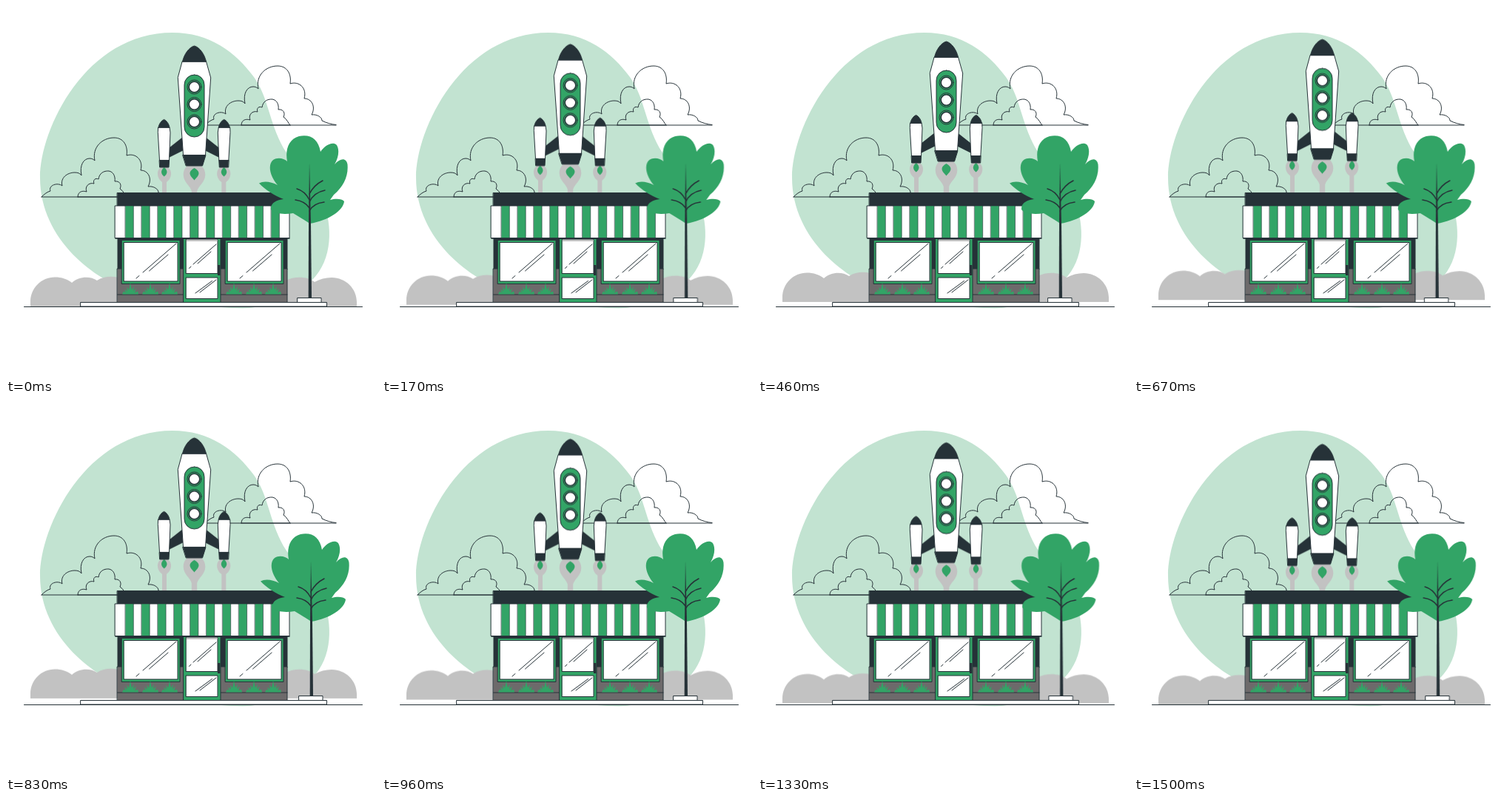
Animation, 500 px wide and 500 px high, one loop 1540 ms. Source, as an HTML page:

```html
<!DOCTYPE html>
<html lang="en">
<head>
<meta charset="utf-8">
<title>Shop launch</title>
<style>
  html, body { margin: 0; width: 100%; height: 100%; overflow: hidden; background: #fff; }
  svg { display: block; width: 100%; height: 100%; }
  .ink { fill: #263238; }
  .green { fill: #32a466; }
  .white { fill: #fff; }
  .grey { fill: #c2c2c2; }
  .wall { fill: #6d6a6b; }
  .line { stroke: #263238; stroke-width: 1; stroke-linejoin: round; stroke-linecap: round; }
  .open { fill: none; }
  .float { animation: float 1540ms linear -44ms infinite; }
  .shake { animation: shake 1540ms cubic-bezier(.3, .12, .7, .88) -44ms infinite; }
  @keyframes float {
    0%, 100% { transform: translateY(.5px); }
    50% { transform: translateY(-9.5px); }
  }
  @keyframes shake {
    0%, 100% { transform: translateX(.2px); }
    10%, 90% { transform: translateX(-.8px); }
    20%, 80% { transform: translateX(2.2px); }
    30%, 50%, 70% { transform: translateX(-3.8px); }
    40%, 60% { transform: translateX(4.2px); }
  }
</style>
</head>
<body>
<svg viewBox="0 0 500 500">
  <defs>
    <g id="cloud" class="line open">
      <path d="M48 258C52 254 56 251 60 250C57 242 70 238 76 243C73 232 83 225 93 225C97 225 100 226 102 229C99 215 105 206 113 206C116 206 118 207 120 209C116 191 130 178 146 178C159 178 165 189 163 202C175 198 186 208 182 222C192 222 198 233 192 244C199 243 206 247 206 252C212 255 219 257 225 257.500"/>
      <path d="M48 258H225M97 258H163M97 258C97 251 103 249 109 251C106 244 112 238 119 240C117 235 121 232 125 234C126 226 132 222.500 139 223C145 224 148 230 147 237C153 236 157 241 154 247C159 250 160 255 163 258"/>
    </g>

    <g id="booster">
      <path class="grey" d="M211 290V238C202 232 203 217 214 217S226 232 217 238V290Z"/>
      <path class="green" d="M213.700 218C216 220 217.500 222 217.500 224.500C217.500 227 215.500 229 213.700 230.500C212 229 210 227 210 224.500C210 222 211.500 220 213.700 218Z"/>
      <path class="ink" d="M239 177L220 192V205L240 195Z"/>
      <path class="white line" d="M206 164H221L222 171L220.500 209H207.500L205.300 171Z"/>
      <path class="ink line" d="M206 164C207 159 210 155 213.600 153.500C217 155 220 159 221 164ZM207.500 208.500H220.500L220 218H208Z"/>
    </g>

    <g id="port">
      <circle class="green line" r="9.500"/>
      <circle class="white line" r="7.300" style="stroke-width:1.600"/>
    </g>

    <path id="plant" class="green" d="M-11 15L-9 11L-6 13L-8 8L-4 11L-5 5L-2 9L0 0L2 9L5 4L4 11L8 7L6 13L10 11L11 15Z"/>

    <g id="window">
      <path class="green line" d="M156.500 316.500H235V375.500H156.500Z"/>
      <path class="white line" d="M159.500 319.500H232V372H159.500Z"/>
      <path class="line open" d="M185 360L230 321M193.500 358L219 336M176 368L180 364.500"/>
      <use href="#plant" x="168" y="374.500"/>
      <use href="#plant" x="195" y="374.500"/>
      <use href="#plant" x="221" y="374.500"/>
    </g>
  </defs>

  <path fill="#c2e3d1" d="M225 36C275 36 310 62 335 96C352 120 353 142 368 178C384 216 413 228 429 266C441 296 442 342 414 370C392 392 350 408.500 320 408.500C270 408 205 395 165 383C125 372 46 318 46 232C46 166 108 36 225 36Z"/>
  <use href="#cloud"/>
  <use href="#cloud" x="221" y="-97"/>

  <g class="float grey">
    <path d="M33 406V400C33 381 48 366.500 66 366.500C75 366.500 83 369 89 374C99 365 114 365 123 371C132 365 143 365 152 367V406Z"/>
    <path d="M378 406V371C390 365 407 365 417 373C424 369 432 367 440 367C459 367 474 382 474 400V406Z"/>
  </g>

  <g class="float">
    <use href="#booster"/>
    <use href="#booster" transform="matrix(-1 0 0 1 508.300 0)"/>
    <path class="grey" d="M250.800 290V250C249 243 239.700 238 239.700 228C239.700 219 246 213 254.500 213S269.300 219 269.300 228C269.300 238 260 243 258.200 250V290Z"/>
    <path class="green" d="M254.500 219C258 221 260.500 223 260.500 226C260.500 229.500 257 232.500 254.500 235.500C252 232.500 248.500 229.500 248.500 226C248.500 223 251 221 254.500 219Z"/>
    <path class="white line" d="M238.500 75H270.500L276.700 97L269.500 201.500H239.500L232.300 97Z"/>
    <path class="ink line" d="M238.500 75C241 65 247 56 254.500 54C262 56 268 65 270.500 75ZM239 201.500H270L265.500 216H243.500Z"/>
    <rect class="green line" x="241" y="93" width="27" height="84" rx="13.500"/>
    <use href="#port" x="254.500" y="109.500"/>
    <use href="#port" x="254.500" y="133"/>
    <use href="#port" x="254.500" y="156.500"/>
  </g>

  <path class="line open" d="M24.500 406.500H481.500"/>
  <path class="white line" d="M101 400.500H433.500V406H101Z"/>

  <path class="ink" d="M150.500 313H380.500V356H150.500Z"/>
  <path class="wall line" d="M150.500 355H380V400.500H150.500ZM150.500 390H380"/>
  <path class="ink line" d="M150.500 252.500H380V270H150.500Z"/>
  <path class="white line" d="M147.500 270H383V313.500H147.500Z"/>
  <g id="stripes" class="green line" style="stroke-width:.6"></g>
  <path class="line open" d="M148 314H383" style="stroke-width:1.600"/>

  <use href="#window"/>
  <use href="#window" x="140"/>

  <path class="green line" d="M240 314.500H290V400.500H240Z"/>
  <path class="white line" d="M243.500 315.500H286V361.500H243.500ZM243.500 367H286V395.500H243.500Z"/>
  <path class="grey" d="M244 315.500H285.500V318H244Z"/>
  <path class="line open" d="M253 349L284 322M259 348L277 332M247.500 354.500L250 352M256 388L278.500 371.500M262 387L284 370"/>
  <path class="ink" d="M286 350H289.500V364H286Z"/>

  <g class="shake">
    <path class="green" d="M410.500 294C403 289 395 284 388 280C376 282 362 281 358 275C357 266 366 262 375 261C362 256 350 248 342 239.500C348 236 358 237 367 242C357 230 353 215 361 208C367 204 376 206 380 210C377 194 382 180 396 176C412 173 422 180 425 197C430 189 440 183 446 187C451 192 450 204 444 214C452 205 460 205 461.500 214C463 230 456 244 443 255L438 262C445 260 454 260 457 264C456 276 436 290 410.500 294Z"/>
    <path class="ink" d="M410 212L412 294L413 394.500H408.700L409 294Z"/>
    <path class="line open" style="stroke-width:1.500" d="M410 262C406 254 400 249 393 247M410 273C405 265 398 263 391 262M410 254C414 246 420 240 428 236M410 265C414 256 421 251 431 249M410 277C414 269 421 266 430 265"/>
    <path class="white line" d="M394 394.500H426V400.500H394Z"/>
  </g>
</svg>
<script>
  const stripes = Array.from({ length: 10 }, (_, i) => `M${161.300 + i * 21.900} 270h11v43.500h-11Z`);
  document.getElementById("stripes").innerHTML = `<path d="${stripes.join("")}"/>`;
</script>
</body>
</html>
```
